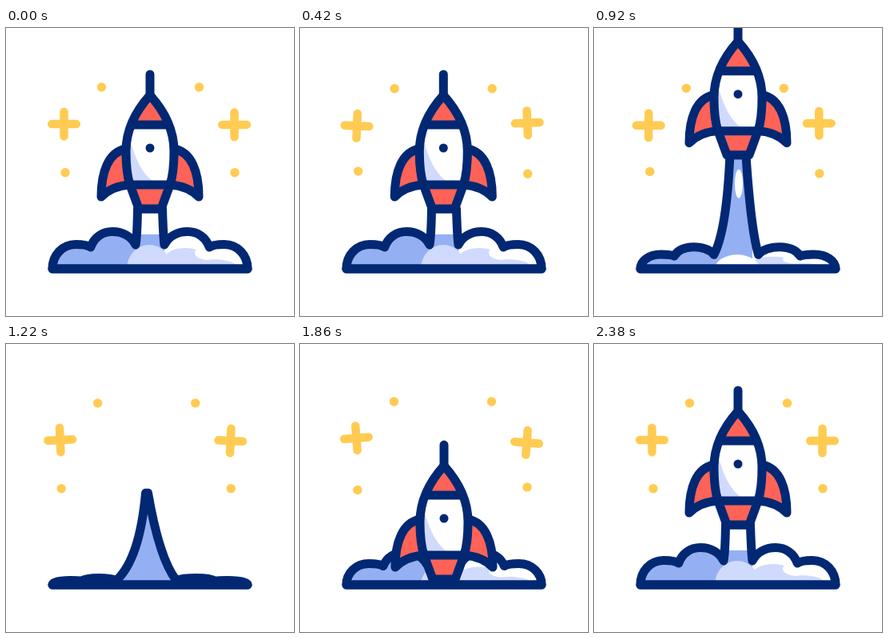
These frames come from a looping animation (360x360 px, 2.4 s). An HTML page with a canvas:

```html
<!DOCTYPE html>
<html lang="en">
<head>
<meta charset="utf-8">
<title>Rocket launch</title>
<style>
  html, body { margin: 0; width: 100%; height: 100%; overflow: hidden; background: #fff; }
  canvas { display: block; width: 360px; height: 360px; }
</style>
</head>
<body>
<canvas id="stage"></canvas>
<script>
const LOOP = 2400, GROUND = 301, LINE = 11;
const NAVY = '#022873', RED = '#ff6358', YELLOW = '#ffcb52',
      BLUE = '#94b0f2', PALE = '#d0dafc', WHITE = '#fff';

const canvas = document.getElementById('stage');
const ctx = canvas.getContext('2d');
const dpr = window.devicePixelRatio || 1;
canvas.width = canvas.height = 360 * dpr;

const clamp = u => Math.max(0, Math.min(1, u));

function ease(t, from, to) {
  const u = clamp((t - from) / (to - from));
  return u * u * (3 - 2 * u);
}

// Rises from 0 to 1 over a..b, falls back over c..d
const pulse = (t, a, b, c, d) => ease(t, a, b) - ease(t, c, d);

function fill(path, color) {
  ctx.fillStyle = color;
  ctx.fill(path);
}

function stroke(path, color = NAVY, width = LINE) {
  ctx.strokeStyle = color;
  ctx.lineWidth = width;
  ctx.stroke(path);
}

function ellipse(x, y, rx, ry, color) {
  const p = new Path2D();
  p.ellipse(x, y, rx, ry, 0, 0, Math.PI * 2);
  fill(p, color);
}

const body = new Path2D('M180 84C162 104 150 128 150 154C150 170 151 184 155 196L166 226H194L205 196C209 184 210 170 210 154C210 128 198 104 180 84Z');
const nose = new Path2D('M180 84C171 94 165 106 160 121H200C195 106 189 94 180 84Z');
const skirt = new Path2D('M155 196L166 226H194L205 196Z');
const shade = new Path2D('M150 133C158 138 159 172 183 191H155C152 180 150 160 150 133Z');
const bars = new Path2D('M180 58V84M160 121H200M155 196H205');
const fin = new Path2D('M150 151C128 155 119 180 119 211C128 202 140 197 155 196C152 182 150 168 150 151Z');
const fins = new Path2D(fin);
fins.addPath(fin, new DOMMatrix([-1, 0, 0, 1, 360, 0]));
const tip = new Path2D('M180 92L168 112H192Z');
const spark = new Path2D('M180 99L175 107H185Z');
const base = new Path2D('M58 301H302');
const plus = new Path2D('M-15.3 0H15.3M0 -15.3V15.3');

// Bezier points of one cloud: share of its width, height above ground
const PUFF = [[0, 0], [0, 17], [.12, 30.5], [.28, 30.5], [.36, 30.5], [.42, 30], [.46, 27],
              [.5, 39], [.6, 46.5], [.72, 46.5], [.85, 46.5], [.95, 40], [1, 30]];

function addCloud(path, points, x, y) {
  const at = ([u, h]) => [x(u), y(h)];
  path.lineTo(...at(points[0]));
  for (let i = 1; i < points.length; i += 3)
    path.bezierCurveTo(...points.slice(i, i + 3).flatMap(at));
}

function rocketY(t) {
  if (t < 1235) return -67 * (Math.max(0, t - 400) / 520) ** 2.9;
  return 130 * (1 + Math.cos(Math.PI * clamp((t - 1155) / 1073)));
}

function drawSky(t) {
  const a = t / LOOP * Math.PI * 2;
  const swing = 1 - Math.cos(a), lift = Math.sin(a);
  const dx = -2.4 * swing;
  for (const side of [1, -1]) {
    ctx.save();
    ctx.translate(179 - 106.5 * side + dx, 120.5 + (2.5 * lift - .4) * side);
    ctx.rotate((3.5 * lift - 1.2 * swing) * side * Math.PI / 180);
    stroke(plus, YELLOW, 10.5);
    ctx.restore();
    ellipse(180.5 - 61 * side + dx, 74 + 2 * lift, 5.7, 5.7, YELLOW);
    ellipse(180 - 106 * side + dx, 180.7 - 1.8 * lift * side, 5.7, 5.7, YELLOW);
  }
}

// Height of the smoke column: follows the rocket, then drops on its own
function smokeTop(t, off, foot) {
  if (t > 1060 && t < 1640) return 95 + 191 * (1 - (1 - (t - 1060) / 580) ** 2);
  return Math.min(226 + off, foot);
}

function smokeShape(t, off, squash, scale) {
  const left = 162 - 24 * squash, right = 198 + 15 * squash;
  const foot = GROUND - 30 * scale;
  const top = smokeTop(t, off, foot);
  const half = 15.5 - 14 * pulse(t, 750, 1150, 1600, 1700);
  const mid = 180 - 4 * pulse(t, 900, 1150, 1300, 1550);
  const tl = mid - half, tr = mid + half;
  const bend = foot - (foot - top) * .25;
  const y = h => GROUND - h * scale;

  const p = new Path2D();
  p.moveTo(58, GROUND);
  addCloud(p, PUFF, u => 58 + (left - 58) * u, y);
  p.quadraticCurveTo(tl - (tl - left) * .2, bend, tl, top);
  p.lineTo(tr, top);
  p.quadraticCurveTo(tr + (right - tr) * .4, bend, right, foot);
  addCloud(p, [...PUFF].reverse(), u => 302 - (302 - right) * u, y);
  p.closePath();
  return p;
}

function drawSmoke(t, off) {
  const squash = pulse(t, 600, 1240, 1450, 2000);
  const scale = 1 - .82 * squash;
  const calm = 1 - pulse(t, 520, 720, 1700, 1850);
  const p = smokeShape(t, off, squash, scale);

  fill(p, BLUE);
  ctx.save();
  ctx.clip(p);
  if (scale > .4) {
    ctx.fillStyle = WHITE;
    ctx.fillRect(198, GROUND - 60 * scale, 110, 60 * scale);
    ellipse(224, GROUND - 14 * scale, 25, 12 * scale, PALE);
    ellipse(255, GROUND - 4 * scale, 32, 8 * scale, PALE);
    ellipse(252, GROUND - 20 * scale, 16, 9 * scale, WHITE);
    ellipse(179, GROUND, 28, 30 * scale, calm > .5 ? PALE : WHITE);
  }
  ctx.globalAlpha = calm;
  ctx.fillStyle = WHITE;
  ctx.fillRect(160, 200, 40, 58);
  ctx.globalAlpha = pulse(t, 700, 850, 980, 1060);
  ellipse(181, 262 + off, 5, 18, WHITE);
  ctx.restore();
  stroke(p);
}

function drawRocket(t, off) {
  ctx.save();
  ctx.beginPath();
  ctx.rect(0, 0, 360, GROUND);
  ctx.clip();
  ctx.translate(-.7 * pulse(t, 200, 420, 420, 620), off);
  fill(fins, RED);
  stroke(fins);
  fill(body, WHITE);
  fill(shade, PALE);
  fill(nose, RED);
  fill(skirt, RED);
  ctx.globalAlpha = pulse(t, 1300, 1400, 1560, 1760);
  fill(tip, '#f2884c');
  fill(spark, '#fff4df');
  ctx.globalAlpha = 1;
  stroke(body);
  stroke(bars);
  ellipse(180, 150, 5.5, 5.5, NAVY);
  ctx.restore();
}

function draw(now) {
  const t = now % LOOP, off = rocketY(t);
  ctx.setTransform(dpr, 0, 0, dpr, 0, 0);
  ctx.fillStyle = WHITE;
  ctx.fillRect(0, 0, 360, 360);
  ctx.lineCap = ctx.lineJoin = 'round';
  drawSky(t);
  drawSmoke(t, off);
  drawRocket(t, off);
  stroke(base);
}

const start = performance.now();
function tick() {
  draw(performance.now() - start);
  requestAnimationFrame(tick);
}
tick();
</script>
</body>
</html>
```
